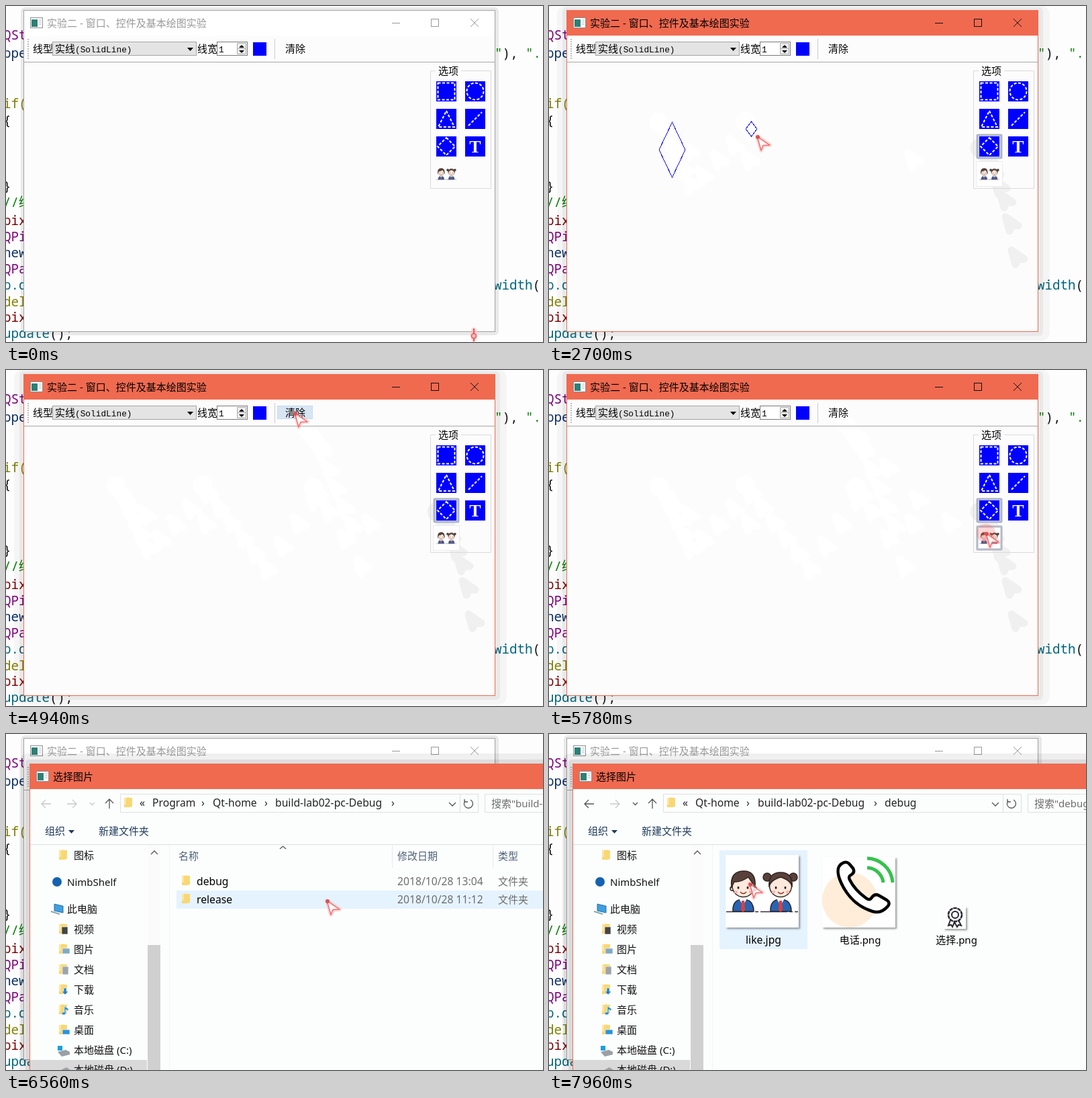
Recreate the animation shown at these times as an HTML page. Size 800 by 500 pixels, loop 8 s.

```html
<!DOCTYPE html>
<html lang="zh-CN">
<head>
<meta charset="utf-8">
<title>绘图实验</title>
<style>
html, body { margin: 0; width: 100%; height: 100%; overflow: hidden; background: #fdfdfd; }
svg { display: block; }
text { font: 15px 'Noto Sans', 'Noto Sans CJK SC', 'Noto Sans CJK', sans-serif; white-space: pre; }
.latin { font-size: 15.7px; }
.mono { font: 500 19.2px 'Noto Sans Mono', 'Noto Sans CJK SC', monospace; }
.field { font: 12.8px 'Liberation Mono', 'Noto Sans CJK SC', monospace; }
.line { fill: none; stroke: #555; stroke-width: 1.3; }
.dash { fill: none; stroke: #fff; stroke-width: 2; stroke-dasharray: 4 2.5; }
.crisp { shape-rendering: crispEdges; }
.thumb { fill: #fff; filter: drop-shadow(2px 2px 1.5px #0006); }
</style>
</head>
<body>
<svg width="800" height="500" viewBox="0 0 800 500">
<defs>
  <g id="appIcon">
    <rect x=".5" y=".5" width="18" height="15" fill="#fff" stroke="#8a8f94"/>
    <rect x="2" y="3" width="9" height="11" fill="#2c8076"/>
    <path d="M13 4h4M13 7h4M13 10h4" stroke="#bbb"/>
  </g>
  <g id="folder">
    <path d="M0 1L8 0V15L0 14Z" fill="#ffe69c"/>
    <path d="M3 1H12V14L8 15H0V11H3Z" fill="#f8d775"/>
  </g>
  <g id="kids">
    <path d="M264 264.500H371" stroke="#3a2f33" stroke-width="1.500" stroke-dasharray="40 3 5 3"/>
    <path d="M274 264Q273 246 289 246T305 264ZM330 264Q329 246 345 246T361 264Z" fill="#2864b4" stroke="#2b2430" stroke-width="1.500"/>
    <path d="M283 245h12l-6 10ZM339 245h12l-6 10Z" fill="#fff"/>
    <path d="M287 248h4l1 14-3 3-3-3ZM343 248h4l1 14-3 3-3-3Z" fill="#dd4038"/>
    <g fill="#ffe9dc" stroke="#3a2926" stroke-width="1.5">
      <circle cx="273" cy="230" r="3"/><circle cx="306" cy="230" r="3"/>
      <circle cx="289.500" cy="226" r="16.500"/><circle cx="345" cy="226" r="16.500"/>
    </g>
    <g fill="#59413b" stroke="#30231f" stroke-width="1.5">
      <path d="M272 228Q269 205 289 204T307 228Q303 221 297 213Q285 221 276 220Z"/>
      <circle cx="325" cy="213" r="6"/><circle cx="364" cy="213" r="6"/>
      <path d="M328 228Q326 206 345 206T362 228Q361 218 345 213Q329 218 328 228Z"/>
    </g>
    <path d="M282 227v3.500M296 227v3.500M338 227v3.500M352 227v3.500" stroke="#222" stroke-width="2.500"/>
    <path d="M285 235q4.500 5 9 0M341 235q4.500 5 9 0" fill="none" stroke="#8c342c" stroke-width="1.500"/>
    <path d="M276 235h5M298 235h5M332 235h5M353 235h5" stroke="#ffb9ad" stroke-width="4"/>
  </g>
  <path id="arrow" d="M0 0L19 13 9 13.500 6 21Z" stroke-linejoin="round"/>
</defs>
<rect width="800" height="500" fill="#fdfdfd"/>
<g id="code"></g>

<g id="shadowOn"><rect x="12" width="734" height="498" rx="12" opacity=".03"/><rect x="20" y="2" width="716" height="489" rx="6" opacity=".05"/></g>
<rect id="shadowOff" x="22" y="2" width="712" height="488" rx="6" opacity=".08"/>
<rect x="27" y="7" width="701" height="477" fill="#fcfcfc"/>
<rect id="bar" x="27" y="7" width="701" height="37"/>
<use href="#appIcon" x="36" y="17"/>
<g id="caption">
  <text x="61" y="31">实验二 - 窗口、控件及基本绘图实验</text>
</g>
<path id="controls" class="crisp" fill="none" d="M575 25.500h12M633.500 19.500h11v11h-11z"/>
<path id="closer" d="M692 19l12 12M704 19l-12 12"/>
<g id="ghosts" stroke-width="11" stroke-linejoin="round"></g>
<rect id="panelShade" x="627" y="83" width="101" height="401" fill="#f3f3f3"/>

<path d="M33 49v30" stroke="#aaa" stroke-width="2" stroke-dasharray="1.500 2"/>
<path d="M27 83.500H728" stroke="#a8a8a8"/><path d="M400.500 49v30" stroke="#ccc"/>
<rect id="clearHover" x="404.500" y="53.500" width="52" height="19" fill="#d8e6f2" stroke="#c4dcef"/>
<text x="40" y="69">线型</text><text x="285" y="69">线宽</text><text x="416" y="69">清除</text>
<rect x="69.500" y="53.500" width="214" height="20" fill="#e4e4e4" stroke="#a5a5a5"/>
<text x="73" y="69"><tspan>实线</tspan><tspan class="field">(SolidLine)</tspan></text>
<path d="M270 62h9l-4.500 5z"/>
<rect x="314.500" y="53.500" width="45" height="20" fill="#fff" stroke="#7a7a7a"/>
<text class="field" x="317" y="69">1</text>
<path d="M344.500 55.500h13v8h-13zM344.500 63.500h13v8h-13z" fill="#eee" stroke="#aaa"/>
<path d="M347 62h8l-4-4zM347 66h8l-4 4z"/>
<rect x="368" y="54" width="20" height="20" fill="#00f"/>

<path d="M640 96.500H632.500V271.500H722.500V96.500H678" fill="none" stroke="#dadada"/>
<text x="644" y="102">选项</text>
<rect id="diamondOn" x="638" y="192" width="36" height="34" rx="1" fill="#d5daea" stroke="#aeb5c9" stroke-width="3"/>
<rect id="imageHover" x="636.500" y="231.500" width="39" height="37" fill="#fefefe" stroke="#ececec"/>
<rect id="imageOn" x="638" y="233" width="36" height="34" rx="1" fill="#fff" stroke="#b4bac8" stroke-width="3"/>
<path d="M641 112h30v30h-30zM684 112h30v30h-30zM641 153h30v30h-30zM684 153h30v30h-30zM641 194h30v30h-30zM684 194h30v30h-30z" fill="#00f"/>
<path class="dash" d="M643.500 114.500h25v25h-25zM656 156l12 24h-24zM689 178l20-20M656 196l13 13-13 13-13-13z"/>
<circle class="dash" cx="699" cy="127" r="12.500"/>
<text x="699" y="218" text-anchor="middle" fill="#fff" style="font:bold 26px 'Liberation Serif',serif">T</text>
<use href="#kids" transform="translate(568.700 185.500) scale(.275)"/>
<g id="shapes" class="crisp" fill="none" stroke="#1010e8"></g>
<rect id="frame" x="26.500" y="6.500" width="702" height="478" fill="none"/>

<g id="dialog">
  <rect x="20" y="29" width="900" height="700" rx="12" opacity=".06"/>
  <rect x="29" y="38" width="900" height="700" rx="4" opacity=".08"/>
  <rect x="35" y="44" width="1000" height="700" fill="#fcfefd"/>
  <path d="M35.500 82V520" stroke="#f06a50"/>
  <rect x="35" y="44" width="1000" height="38" fill="#f06a50"/>
  <use href="#appIcon" x="45" y="55"/>
  <text x="70" y="69">选择图片</text>
  <rect x="211" y="165" width="19" height="400" fill="#d0d0d0"/>
  <path class="line" d="M216 179l5-5 5 5"/>
  <g id="content">
    <path d="M36 164.500H800M170.500 89.500H703.500V116.500H170.500ZM676.500 90v26M800 89.500H713.500V116.500H800" fill="none" stroke="#dedede"/>
    <path d="M243.500 165V500" stroke="#f3f4f4"/>
    <path id="back" class="line" stroke-width="1.600" d="M67 104H53m6-6l-6 6 6 6"/>
    <path class="line" style="stroke:#c8c8c8" d="M91 104h14m-6-6l6 6-6 6"/>
    <path id="recent" class="line" d="M125 102l3.500 3.500 3.500-3.500"/>
    <path class="line" d="M154 111V97m-6 6l6-6 6 6M660 102l5 5 5-5M684 99.500a6.500 6.500 0 1 0 8-1.500M683 97v4h5"/>
    <use href="#folder" x="176" y="94"/>
    <g id="crumbs"></g>
    <text id="search" x="723" y="109" fill="#6d6d6d"></text>
    <g fill="#1e395b"><text x="58" y="150">组织</text><path d="M93 143h9l-4.500 5z"/><text x="138" y="150">新建文件夹</text></g>
    <rect x="211" y="165" width="19" height="149" fill="#fbfbfb"/>
    <path class="line" d="M216 179l5-5 5 5"/>
    <rect x="36" y="485" width="174" height="15" fill="#d9d9d9"/>
    <g id="side"></g>
    <circle cx="76" cy="220" r="7" fill="#1462b0"/>
    <path d="M72 253l13 3v10l-13-3z" fill="#3f9fe0" stroke="#2a6fa5"/><path d="M67 264l13 4" stroke="#8aa" stroke-width="2"/>
    <path d="M77 473l12-3 6 3v4l-12 3z" fill="#9aa0a6"/><rect x="77" y="464" width="7" height="7" fill="#18a0e0"/>
    <path d="M82 500l8-4 6 4z" fill="#9aa0a6"/>
    <g id="folders">
      <path d="M575.500 165v34M725.500 165v34" stroke="#e8e8e8"/>
      <path class="line" d="M408 171l4.500-4 4.500 4"/>
      <g fill="#4c607a"><text x="257" y="187">名称</text><text x="583" y="187">修改日期</text><text x="733" y="187">类型</text></g>
      <rect id="rowHover" x="254" width="546" height="27" fill="#e5f3ff"/>
      <use href="#folder" x="262" y="210"/><use href="#folder" x="262" y="237"/>
      <text class="latin" x="284" y="225">debug</text><text class="latin" x="284" y="252">release</text>
      <g fill="#6d6d6d"><text class="latin" x="583" y="225">2018/10/28 13:04</text><text class="latin" x="583" y="252">2018/10/28 11:12</text><text x="733" y="225">文件夹</text><text x="733" y="252">文件夹</text></g>
    </g>
    <g id="files" text-anchor="middle">
      <rect x="254" y="173" width="131" height="147" fill="#e5f3ff"/>
      <rect class="thumb" x="263" y="180" width="109" height="108"/><use href="#kids"/>
      <rect class="thumb" x="407" y="183" width="109" height="105"/>
      <circle cx="448" cy="247" r="41" fill="#ffecd9"/>
      <path d="M436 193C428 198 430 210 435 221C445 243 462 258 482 264C492 267 500 262 505 256C508 252 506 249 503 247L491 240C487 238 484 239 481 243C479 247 476 247 472 244C461 236 453 227 448 217C446 213 447 211 451 209C454 207 455 204 453 200L448 194C445 190 440 190 436 193Z" fill="#fff" stroke="#000" stroke-width="4.500"/>
      <path d="M474 185A39 39 0 0 1 512 221M474 199A25 25 0 0 1 498 221" fill="none" stroke="#35c24d" stroke-width="5"/>
      <rect class="thumb" x="588" y="257" width="33" height="33"/>
      <g fill="none" stroke="#26262e" stroke-width="2"><path d="M598 277l-3 8 4-1 2 3 3-7 4 7 2-3 4 1-4-8"/><circle cx="605" cy="269" r="10" fill="#fff" stroke-width="2.500" stroke-dasharray="5.500 .8"/><circle cx="605" cy="269" r="5"/></g>
      <text class="latin" x="319.500" y="312">like.jpg</text><text x="463.500" y="312">电话.png</text><text x="607" y="312">选择.png</text>
    </g>
  </g>
</g>
<g id="cursor">
  <circle id="ring" r="14" fill="#ff5a5a" opacity=".25"/>
  <use href="#arrow" fill="none" stroke="#ff9d9d" stroke-width="6" opacity=".35"/>
  <use href="#arrow" fill="#fff" fill-opacity=".75" stroke="#f26a6a" stroke-width="1.500"/>
  <circle cx="1" cy="1" r="3" fill="#d95252"/>
</g>
<g id="beam"><ellipse cx="697" cy="489" rx="5" ry="11" fill="#ffc4c4" opacity=".8"/><path d="M697 480v19" stroke="#e55" stroke-width="2"/><circle cx="697" cy="491" r="3.500" fill="#fbb" stroke="#e55" stroke-width="1.500"/></g>
</svg>
<script>
const LOOP = 8000, STEP = 76.67;
const $ = id => document.getElementById(id);
const show = (id, on) => $(id).style.display = on ? '' : 'none';
const paint = (id, attrs) => { for (const k in attrs) $(id).setAttribute(k, attrs[k]); };
const text = (x, y, s, fill = '#111', cls = '') => `<text x="${x}" y="${y}" fill="${fill}" class="${cls}">${s}</text>`;

const purple = '#800080', navy = '#092e64', olive = '#808000', green = '#008000', maroon = '#800000', teal = '#00677c';
$('code').innerHTML = [
  [50, 'QSt', purple], [77, 'ppe', navy], [152, 'if(', olive], [177, '{'], [275, '}'], [299, '//绘', green],
  [326, 'pix', maroon], [350, 'QPi', purple], [374, 'new', navy], [398, 'QPa', purple], [422, 'p.d', teal],
  [447, 'del', olive], [470, 'pix', maroon], [494, 'update<tspan fill="#111">();</tspan>', teal]
].map(([y, s, c]) => text(-4, y, s, c, 'mono')).join('') +
  text(728, 77, '"<tspan fill="#111">),</tspan> ".', green, 'mono') + text(727, 422, 'width<tspan fill="#111">(</tspan>', teal, 'mono');

// Sidebar: label, then the small badge on its folder
const places = [['图标', ''], ['视频', 'M4 5h9v11h-9z', '#444'], ['图片', 'M5 7h11v8h-11z', '#7faac4'], ['文档', 'M5 4h9v12h-9z', '#9ba4ab'],
  ['下载', 'M7 6h4v5h3l-5 5-5-5h3z', '#2280d0'], ['音乐', 'M8 3l6 4v3l-4-2v6a3 2 0 1 1-2-2z', '#1d8ee0'], ['桌面', 'M5 8h11v7h-11z', '#2b93dc']];
$('side').innerHTML = places.map(([name, badge, color], i) => {
  const y = i ? 266 + 30 * i : 186;
  return `<g transform="translate(79 ${y - 14})"><use href="#folder"/><path d="${badge}" fill="${color}" stroke="#fff" stroke-width=".6"/></g>` + text(101, y, name);
}).join('') + text(91, 226, 'NimbShelf') + text(91, 266, '此电脑') + text(101, 476, '本地磁盘 (C:)') + text(101, 505, '本地磁盘 (D:)');

const crumbs = items => items.map(([x, s]) => text(x, 108, s, '#222', 'latin')).join('');
const rootPath = crumbs([[199, '«'], [218, 'Program'], [291, '›'], [308, 'Qt-home'], [385, '›'], [401, 'build-lab02-pc-Debug'], [574, '›']]);
const debugPath = crumbs([[199, '«'], [218, 'Qt-home'], [294, '›'], [311, 'build-lab02-pc-Debug'], [484, '›'], [500, 'debug']]);

// Pointer route: time, x, y
const route = [[0, 697, 484], [76, 689, 364], [153, 680, 314], [230, 672, 279], [383, 654, 238], [610, 642, 211], [1073, 642, 211],
  [1150, 535, 219], [1226, 291, 219], [1303, 201, 206], [1380, 178, 193], [1456, 169, 181], [1533, 164, 173], [1770, 164, 173],
  [2070, 203, 255], [2147, 203, 255], [2223, 222, 243], [2460, 293, 172], [2610, 293, 172], [2990, 381, 286], [3066, 381, 286],
  [3320, 458, 175], [3480, 458, 175], [3680, 522, 282], [3757, 522, 282], [3833, 508, 223], [4160, 459, 103], [4250, 459, 103],
  [4700, 430, 64], [5250, 430, 64], [5480, 563, 205], [5610, 651, 243], [6270, 651, 243], [6515, 478, 248], [6730, 478, 248],
  [7040, 420, 312], [7270, 345, 290], [7490, 299, 226], [7580, 299, 223], [LOOP, 299, 223]];
const clicks = [840, 1700, 2540, 3400, 4860, 5710, 7640];
const diamonds = [[1700, 2110], [2540, 3030], [3400, 3720]];

function pointer(t) {
  const i = Math.max(1, route.findIndex(p => p[0] >= t));
  const [t0, x0, y0] = route[i - 1], [t1, x1, y1] = route[i];
  const k = (t - t0) / (t1 - t0);
  return [x0 + (x1 - x0) * k, y0 + (y1 - y0) * k];
}

// Faint traces stay wherever the pointer has been
const ghosts = [];
function addGhost(time, shape) {
  const [x, y] = pointer(time), color = x > 620 ? '#f0f0f0' : '#fff';
  $('ghosts').insertAdjacentHTML('beforeend', `<g transform="translate(${x} ${y})" fill="${color}" stroke="${color}">${shape}</g>`);
  ghosts.push([time + STEP, $('ghosts').lastChild]);
}
for (let t = STEP; t < 5700; t += STEP) addGhost(t, '<use href="#arrow"/>');
clicks.slice(0, 5).forEach(t => addGhost(t, '<circle r="9"/>'));

function diamond([start, end], t) {
  if (t < start || t >= 4860) return '';
  const [x, y] = pointer(start).map(Math.round), [r, b] = pointer(Math.min(t, end)).map(Math.round);
  const cx = (x + r) / 2, cy = (y + b) / 2;
  return `<path d="M${cx} ${y}L${r} ${cy} ${cx} ${b} ${x} ${cy}Z"/>`;
}

function draw(t) {
  const tick = Math.floor((t + 8) / STEP) * STEP;
  const [x, y] = pointer(tick);
  const active = t >= 840 && t < 6000, inFolder = t >= 7800;

  paint('bar', { fill: active ? '#f06a50' : '#fff' });
  paint('frame', { stroke: active ? '#f06a50' : '#a2a2a2' });
  paint('caption', { fill: active ? '#000' : '#999' });
  for (const id of ['controls', 'closer']) paint(id, { stroke: active ? '#111' : '#999' });
  show('shadowOn', active);
  show('shadowOff', !active);
  show('panelShade', t >= 6265);
  show('diamondOn', t >= 455);
  show('imageHover', t >= 300);
  show('imageOn', t >= 5600);
  show('clearHover', t >= 4600 && t < 5320);
  ghosts.forEach(([time, el]) => el.style.display = time <= tick + 1 ? '' : 'none');
  $('shapes').innerHTML = diamonds.map(d => diamond(d, tick)).join('');

  show('dialog', t >= 6265);
  const left = 1 - Math.min(4, Math.max(0, Math.floor((t - 6265) / 73))) / 4, ease = left * left;
  paint('dialog', { opacity: 1 - .84 * ease, transform: `translate(457 288) scale(${1 - .045 * ease}) translate(-457 -288)` });
  show('content', t >= 6410);
  show('folders', t < 7730);
  show('files', inFolder);
  show('rowHover', y > 205 && y < 260);
  paint('rowHover', { y: y < 233 ? 206 : 233 });
  $('crumbs').innerHTML = t < 7730 ? rootPath : debugPath;
  $('search').textContent = t < 7730 ? '搜索"build-lab02' : '搜索"debug"';
  $('back').style.stroke = t < 7730 ? '#c8c8c8' : '#555';
  $('recent').style.stroke = t < 7730 ? '#c8c8c8' : '#555';

  show('beam', t < 70);
  show('cursor', t >= 70);
  show('ring', clicks.some(c => t >= c && t < c + 75));
  paint('cursor', { transform: `translate(${x} ${y})` });
}

const begin = performance.now();
(function loop() {
  draw((performance.now() - begin) % LOOP);
  requestAnimationFrame(loop);
})();
</script>
</body>
</html>
```
